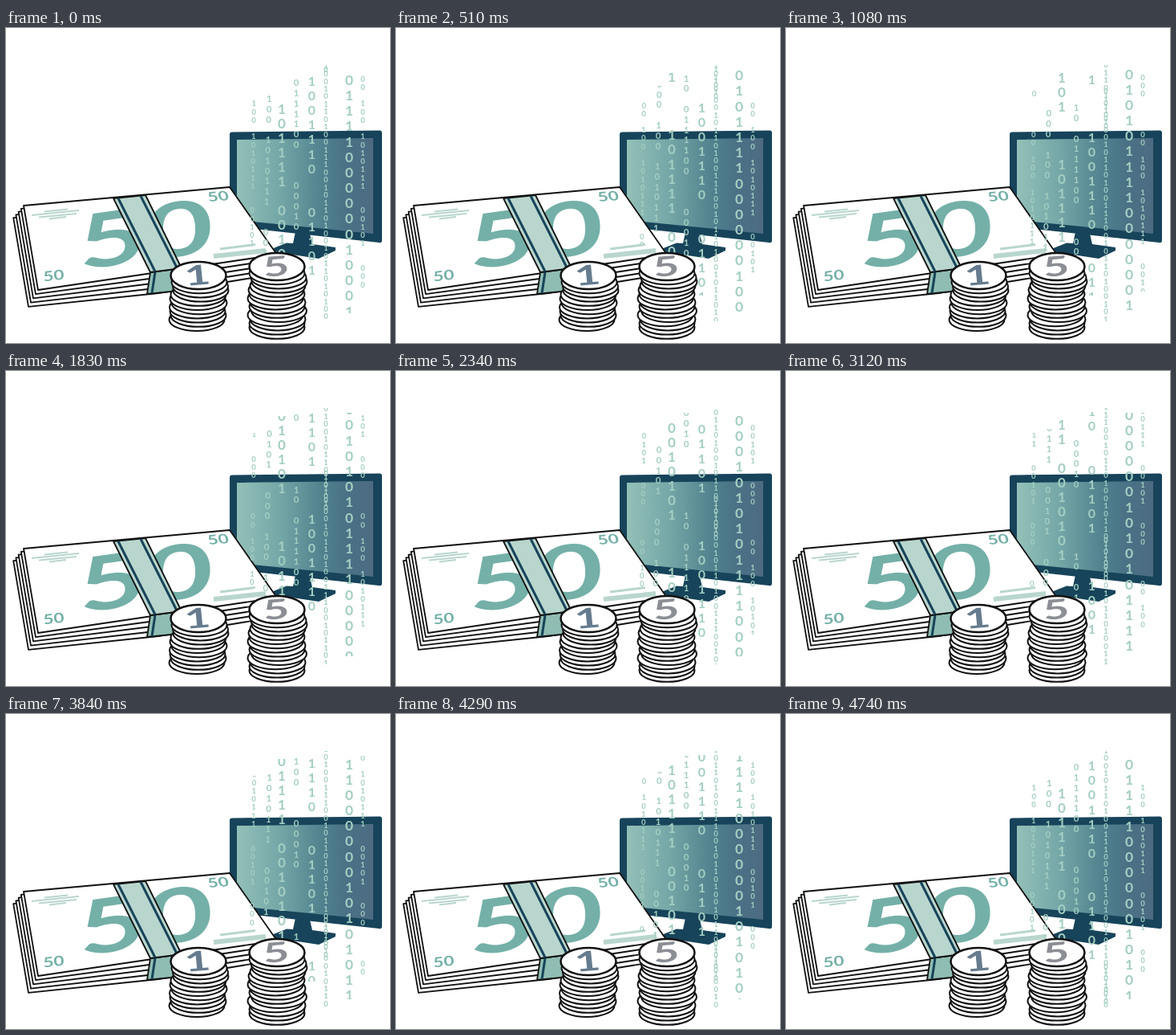
An HTML page that plays this animation: 479x392 px, repeating every 4770 ms.

```html
<!DOCTYPE html>
<html lang="en">
<head>
<meta charset="utf-8">
<title>Cash and data</title>
<style>
  html, body { margin: 0; width: 100%; height: 100%; overflow: hidden; background: #fff; }
  svg { display: block; }
  text { font-family: Lato, sans-serif; font-weight: bold; text-anchor: middle; }
  .ink { fill: #fff; stroke: #111; stroke-width: 1.8; stroke-linejoin: round; }
  .navy { fill: #17445a; }
  .teal { fill: #74b0a8; }
  .rule { stroke: #b9d6ce; fill: none; }
  #rain { fill: #a4cec2; }
</style>
</head>
<body>
<svg id="stage" width="479" height="392" viewBox="0 0 479 392">
  <defs>
    <linearGradient id="screen">
      <stop offset="0" stop-color="#93c0b8"/>
      <stop offset=".3" stop-color="#76a8a8"/>
      <stop offset=".64" stop-color="#4f808d"/>
      <stop offset=".8" stop-color="#4a7286"/>
      <stop offset="1" stop-color="#4d6b82"/>
    </linearGradient>
  </defs>

  <g id="monitor">
    <path class="navy" d="M361 254L379 256 382 269 411 273V277L390 287 331 278V275L350 267.500 358 268Z"/>
    <path class="navy" d="M282 129.500L466 127.500Q469 127.500 469 130.500V264Q469 268 465 267L282 247Q279 246 279 243V132.500Q279 129.500 282 129.500Z"/>
    <path fill="url(#screen)" d="M288 139L458 137V256L288 239Z"/>
  </g>

  <g id="notes">
    <g id="pile"></g>
    <path class="ink" d="M22 221L279 198 338 282 40 326Z"/>
    <g class="teal">
      <text font-size="93" transform="matrix(1.56 -.22 .06 1 176 289.500)">50</text>
      <text font-size="17" transform="matrix(1.32 -.15 .1 1 60 314)">50</text>
      <text font-size="16" transform="matrix(1.4 -.1 .25 1 266 215)">50</text>
    </g>
    <path class="rule" stroke-width="2" d="M48 228.500L77 225.500M32 233L91 227M41 235.500L88 231M54 237.500L75 235"/>
    <path class="rule" stroke-width="3" d="M267 275L311 269.500"/>
    <path class="rule" stroke-width="6" d="M259 284L324 277"/>
    <path class="ink" style="fill:#8fbdb3" d="M180 304L219 299 216 327 176 331Z"/>
    <path stroke="#17445a" stroke-width="3" d="M186 304L182 330"/>
    <path class="ink" style="fill:#b9d6ce" d="M134 212L174 208 219 299 180 304Z"/>
    <path stroke="#17445a" stroke-width="3" d="M140 212L186 303M168 209L213.500 299"/>
  </g>

  <g id="rain"></g>
  <g id="coins"></g>
</svg>
<script>
const LOOP = 4770, STEP = 30, TRAVEL = 307, MIDDLE = 180;
const $ = id => document.getElementById(id);

function add(parent, tag, attrs, text = "") {
  const el = document.createElementNS("http://www.w3.org/2000/svg", tag);
  for (const key in attrs) el.setAttribute(key, attrs[key]);
  el.textContent = text;
  return parent.appendChild(el);
}

// Lower notes of the bundle, bottom one first
for (let i = 4; i > 0; i--) {
  const x = 3.2 * i;
  add($("pile"), "path", {
    class: "ink",
    d: `M${22 - x} ${221 + 3.8 * i}L279 ${198 + 4 * i} ${338 - x} ${282 + 6.5 * i}
        190 ${304 + 6.5 * i} ${40 - 3 * i} ${326 + 5.2 * i}Z`
  });
}

function coinStack(cx, cy, shifts, digit, color) {
  const coin = (dx, dy, ry, width) => add($("coins"), "ellipse", {
    class: "ink", cx: cx + dx, cy: cy + dy, rx: 34.5, ry, style: `stroke-width:${width}`
  });
  for (let i = shifts.length; i > 0; i--) coin(shifts[i - 1], 3 + 5.2 * i, 14, 2);
  coin(0, 0, 17, 2.5);
  add($("coins"), "text", {
    "font-size": 34, fill: color, transform: `matrix(1.65 -.14 .1 1 ${cx} ${cy + 11.5})`
  }, digit);
}
coinStack(240, 308, [1, 2.5, 3, 0, -1, 1, -1.5, -1, 0, -2], "1", "#667c8e");
coinStack(338, 297, [0, 2, 3, 1, -1, 0, -2, 1, 0, 2.5, -2, 1, 0, 0], "5", "#8b8e94");

const sparse = "100 1010111  00101  000    00 ";
const pairs = "100 1010111  00101  000 ";
const dense = "01101001011010011100101101001011010100";

// x, lean, window top, window bottom, first digit, pitch, size, digits, digits that follow
const columns = [
  [308, 0.015, 77, 270, 94, TRAVEL / 30, 9.5, sparse],
  [326, 0.025, 72, 288, 88, TRAVEL / 24, 11.5, pairs],
  [344, 0, 56, 290, 100.5, TRAVEL / 17, 17, "101111 0010101   "],
  [362, 0, 52, 290, 68, TRAVEL / 24, 11.5, "0111100   00010      10 "],
  [381.5, 0, 51, 333, 66.5, TRAVEL / 17, 16, "1001110  01101   "],
  [399, 0, 46, 365, 9.4, 9.45, 9.5, dense],
  [428, 0, 52, 355, 64.5, TRAVEL / 16, 17.5, "0111100000010001", "0111100000010101"],
  [445, 0, 52, 328, 94, TRAVEL / 30, 9.5, sparse]
];

const strips = columns.map(([x, lean, top, bottom, first, pitch, size, digits, next = digits]) => {
  const pane = add($("rain"), "svg", {
    x: x - 14, y: top, width: 28, height: bottom - top,
    viewBox: `${x - 14} ${top} 28 ${bottom - top}`
  });
  const el = add(pane, "g", { "font-size": size });
  [digits, next].forEach((run, copy) => [...run].forEach((digit, i) => {
    if (digit === " ") return;
    const y = first + i * pitch - copy * TRAVEL;
    add(el, "text", { x: x - lean * (y - MIDDLE), y: y + size * 0.36 }, digit);
  }));
  return { el, lean };
});

function draw(now) {
  const time = Math.floor((now % LOOP) / STEP) * STEP;
  const y = TRAVEL * time / LOOP;
  for (const { el, lean } of strips) {
    el.setAttribute("transform", `translate(${(-lean * y).toFixed(2)} ${y.toFixed(2)})`);
  }
}

const start = performance.now();
function tick() {
  draw(performance.now() - start);
  requestAnimationFrame(tick);
}
tick();
</script>
</body>
</html>
```
